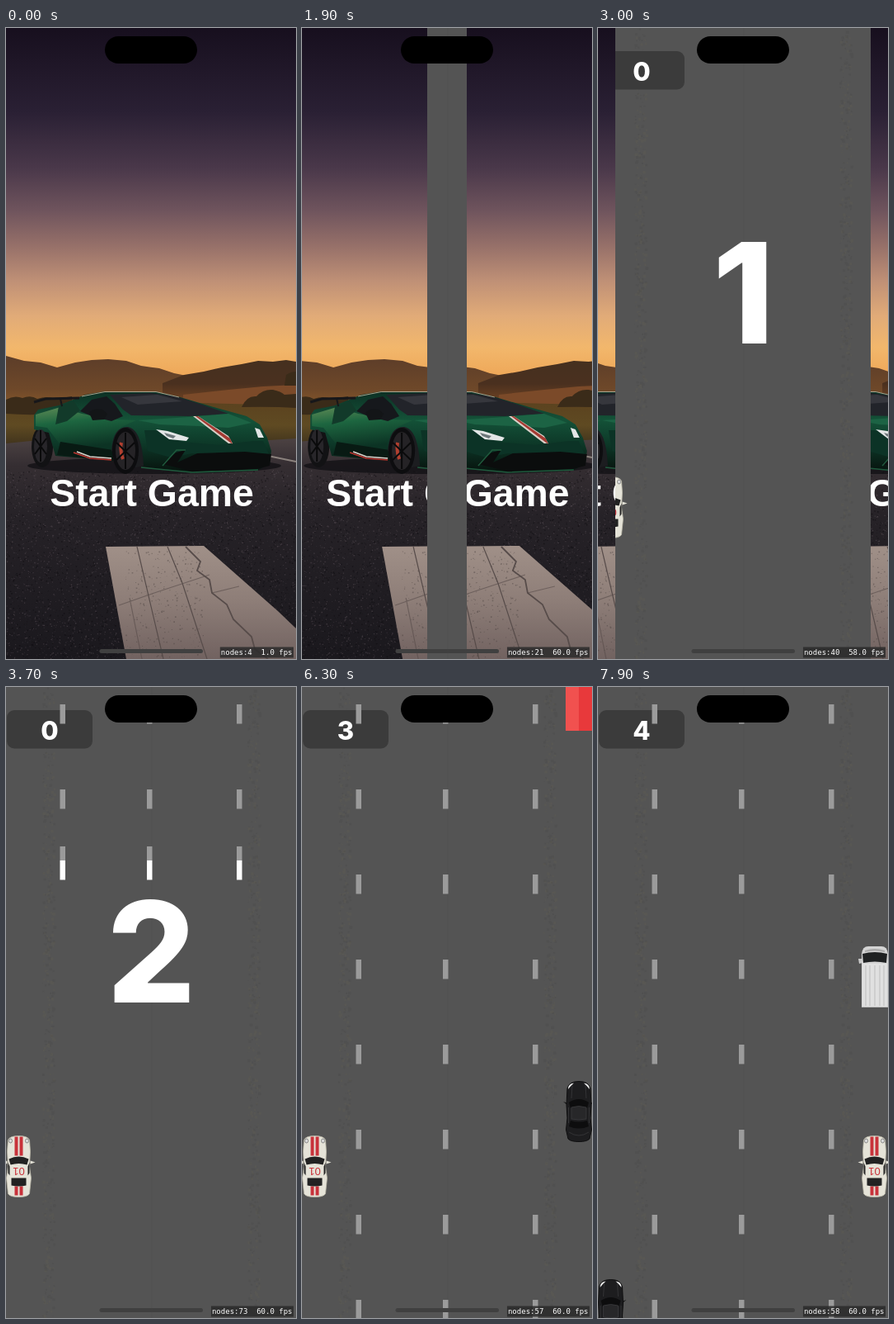
Animation, 352 px wide and 764 px high, one loop 8 s. Source, as an HTML page:

```html
<!DOCTYPE html>
<html lang="en">
<head>
<meta charset="utf-8">
<title>Start Game</title>
<style>
  html, body { margin: 0; width: 100%; height: 100%; overflow: hidden; background: #545454; }
  svg { display: block; width: 352px; height: 764px; }
  .big { font: 800 169px Inter, "Open Sans", sans-serif; }
  .score { font: 800 31px Inter, "Open Sans", sans-serif; }
  .start { font: 700 46.4px "Liberation Sans", Arial, sans-serif; }
  .stats { font: 9px "DejaVu Sans Mono", monospace; }
  .plate { font: 13px "Liberation Sans", Arial, sans-serif; }
</style>
</head>
<body>
<svg viewBox="0 0 352 764" xmlns="http://www.w3.org/2000/svg">
<defs>
  <linearGradient id="sky" x2="0" y2="1">
    <stop offset="0" stop-color="#170f1e"/><stop offset=".24" stop-color="#2a2034"/>
    <stop offset=".4" stop-color="#4a384a"/><stop offset=".52" stop-color="#6f545d"/>
    <stop offset=".62" stop-color="#967069"/><stop offset=".72" stop-color="#bf9076"/>
    <stop offset=".82" stop-color="#e1ab78"/><stop offset=".91" stop-color="#f2b76c"/>
    <stop offset="1" stop-color="#eea656"/>
  </linearGradient>
  <linearGradient id="tarmac" x2="0" y2="1">
    <stop offset="0" stop-color="#4c4242"/><stop offset=".12" stop-color="#352e32"/>
    <stop offset=".35" stop-color="#262227"/><stop offset="1" stop-color="#1a181d"/>
  </linearGradient>
  <linearGradient id="hill" x2="0" y2="1">
    <stop offset="0" stop-color="#5c3d29"/><stop offset=".55" stop-color="#6e4829"/><stop offset="1" stop-color="#93602c"/>
  </linearGradient>
  <linearGradient id="ridge" x2="0" y2="1">
    <stop offset="0" stop-color="#45301f"/><stop offset=".6" stop-color="#4a301f"/><stop offset="1" stop-color="#6b4122"/>
  </linearGradient>
  <linearGradient id="grass" x2="0" y2="1">
    <stop offset="0" stop-color="#5b421f"/><stop offset=".5" stop-color="#5f4a22"/><stop offset="1" stop-color="#392e1b"/>
  </linearGradient>
  <linearGradient id="paint" x2="0" y2="1">
    <stop offset="0" stop-color="#0c3024"/><stop offset=".35" stop-color="#145238"/>
    <stop offset=".65" stop-color="#0d3828"/><stop offset="1" stop-color="#07120d"/>
  </linearGradient>
  <linearGradient id="side" x2=".25" y2="1">
    <stop offset="0" stop-color="#5f8a55"/><stop offset=".4" stop-color="#1d6640"/><stop offset="1" stop-color="#0c3324"/>
  </linearGradient>
  <linearGradient id="stripe" x2="0" y2="1">
    <stop offset="0" stop-color="#a09088"/><stop offset=".5" stop-color="#8d7d77"/><stop offset="1" stop-color="#716260"/>
  </linearGradient>
  <clipPath id="halfL"><path d="M0 0H176V764H0z"/></clipPath>
  <clipPath id="halfR"><path d="M176 0H352V764H176z"/></clipPath>

  <g id="photo">
    <path fill="url(#sky)" d="M0 0H352V425H0z"/>
    <path fill="url(#hill)" d="M0 397L22 403 42 405 62 411 84 405 104 402 124 401 146 403 164 409 186 412 204 418 224 422V470H0z"/>
    <path fill="url(#ridge)" d="M190 430L216 420 240 416 262 411 286 407 306 403 324 404 340 402 352 404V450H190z"/>
    <path fill="#7b4a29" d="M215 444L270 438 312 434 352 432V470H215z"/>
    <path fill="url(#grass)" d="M0 452H120L240 454 352 457V510H0z"/>
    <path fill="#3a2b19" d="M0 450q10 -6 20 -2 10 -4 18 1 12 -4 22 0l20 -3V465q-40 5 -80 2zM286 459q6 -14 18 -13 8 -9 20 -8 10 2 14 6l14 -1V460q-30 -2 -66 -1zM340 420q6 -4 12 -4V433h-14z"/>
    <path fill="url(#tarmac)" d="M0 503L40 499H320L352 497V764H0z"/>
    <path stroke="#8b827d" stroke-width="2" d="M318 518L352 525"/>
    <path id="grit" fill="#6b6067" opacity=".4"/>
    <path id="pits" fill="#0d0b0f" opacity=".5"/>
    <path fill="url(#stripe)" d="M121 628L240 627 330 706 352 727V764H146z"/>
    <g fill="none" stroke="#574c4a" stroke-width="1.2">
      <path d="M159 628L191 764M196 628L214 672 244 764"/>
      <path stroke-width="1.8" d="M218 628L236 646 232 657 247 668 250 684 268 698 276 716 298 737 302 752 318 764"/>
      <path opacity=".6" d="M137 699L180 684 247 662M165 764L150 690M250 684L283 676"/>
    </g>
    <path id="wear" fill="#4c4342" opacity=".45"/>
    <ellipse cx="180" cy="530" rx="154" ry="10" fill="#121114" opacity=".8"/>
    <g>
      <ellipse cx="44" cy="507" rx="13" ry="25" fill="#121214"/>
      <path fill="url(#paint)" d="M34 469L39 462 64 457 96 444 120 440 180 440 208 446 252 459 292 470 308 480 317 496 322 512 320 528 306 535 228 538 186 534 162 530 130 524 60 518 52 490 34 486z"/>
      <path fill="url(#side)" d="M36 468L66 459 92 467 132 474 158 475 140 483 130 494 126 510 84 508 64 502 50 484 36 482z"/>
      <path fill="#123a2a" d="M64 458L82 452 90 463 74 476 60 480z"/>
      <path fill="#081a13" d="M66 501L130 511V524L62 517z"/>
      <path fill="#16181c" d="M90 464L104 450 122 446 132 455 142 470 128 476 104 470z"/>
      <path fill="#22242a" d="M126 444L176 442 206 446 238 456 270 467 222 470 152 469 142 462z"/>
      <path fill="#4a4a50" opacity=".5" d="M140 447L184 444 214 452 160 456z"/>
      <path fill="none" stroke="#a8a590" stroke-width="1" d="M92 446L120 440.5H182L210 447"/>
      <path fill="#131517" d="M101 466q4 -6 16 -4l6 5 -4 7 -14 1z"/>
      <path fill="#1c6344" d="M160 475L222 471 270 467 298 478 270 484 234 482 186 480z"/>
      <path fill="#0c3326" d="M168 487L182 487 214 501 258 505 300 500 312 500 320 518 226 515 200 520 172 512z"/>
      <path fill="#d8d0c8" d="M227 470L233 470 270 494 275 503 270 503z"/>
      <path fill="#a43a32" d="M230 470L233 470 272 497 275 504z"/>
      <path fill="#e3e6e6" d="M182 486L196 488 222 496 219 500 198 498zM302 484L308 486 313 496 306 496z"/>
      <path fill="#6d777a" d="M192 490l14 4 -3 3 -8 -3z"/>
      <path fill="#0b0d0d" d="M190 528L206 514 218 511 208 526 232 515 290 513 322 516 320 530 304 534 226 537z"/>
      <path fill="none" stroke="#1f5a3d" stroke-width="1.5" d="M190 530L207 511 218 511M164 532L226 538 306 535"/>
      <path fill="none" stroke="#ddd4cd" stroke-width="1.6" d="M86 513L102 519 128 521"/>
      <path fill="none" stroke="#bd3631" stroke-width="1.5" d="M82 514L102 521 128 523"/>
      <path fill="none" stroke="#17171a" stroke-width="3" d="M34 453L48 449 89 448"/>
      <path fill="none" stroke="#17171a" stroke-width="2" d="M66 449L68 458"/>
      <path fill="#1c1d20" d="M128 512q2 -30 20 -29 17 3 19 47l-10 2z"/>
      <ellipse cx="145" cy="512" rx="16" ry="28" fill="#0d0d0f"/>
      <ellipse cx="145" cy="512" rx="12" ry="23" fill="#252326"/>
      <path fill="none" stroke="#b23f2f" stroke-width="4" d="M140 502q-2 10 2 20"/>
      <path stroke="#0a0a0b" stroke-width="2" d="M145 490V534M134 502L156 523M134 523L156 502"/>
      <ellipse cx="42" cy="506" rx="8" ry="20" fill="#28262a"/>
      <path stroke="#0a0a0b" stroke-width="2" d="M42 487V525M35 497L49 516M35 516L49 497"/>
    </g>
    <text class="start" x="177" y="579" text-anchor="middle" fill="#fff">Start Game</text>
  </g>

  <g id="racer">
    <path fill="#e5e3d8" d="M-20 -5l6 -2v4zM20 -5l-6 -2v4z"/>
    <path fill="#e5e3d8" stroke="#b9b6a8" stroke-width=".8" d="M-13 -32Q-11 -37 0 -37 11 -37 13 -32L14 -18 13 0 15 14 13 33Q11 37 0 37 -11 37 -13 33L-15 14 -13 0 -14 -18z"/>
    <path fill="#c8323a" d="M-5 -36h4v23h-4zM1 -36h4v23h-4zM-5 24h4v11h-4zM1 24h4v11h-4z"/>
    <path fill="#222" d="M-12 -9Q0 -15 12 -9L10 -2Q0 -5 -10 -2zM-9 14H9V23Q0 25 -9 23zM-13 -5l2 5v11l-2 -3zM13 -5l-2 5v11l2 -3z"/>
    <ellipse cx="-10" cy="-31" rx="2" ry="2.5" fill="#ddd" stroke="#666" stroke-width=".7"/>
    <ellipse cx="10" cy="-31" rx="2" ry="2.5" fill="#ddd" stroke="#666" stroke-width=".7"/>
    <text class="plate" transform="translate(0 1) rotate(180)" text-anchor="middle" fill="#c8323a">01</text>
  </g>
  <g id="sedan">
    <path fill="#151516" d="M-19 -12l6 2v3zM19 -12l-6 2v3z"/>
    <path fill="#1d1d1f" stroke="#0f0f10" d="M-14 -28Q-12 -36.500 0 -36.500 12 -36.500 14 -28L15 -8 14 8 15.500 22 13 33Q10 36.500 0 36.500 -10 36.500 -13 33L-15.500 22 -14 8 -15 -8z"/>
    <path fill="#eee" d="M-13 -27Q-13 -34 -6 -34.500 -10 -31 -13 -27zM13 -27Q13 -34 6 -34.500 10 -31 13 -27z"/>
    <path fill="#0d0d0e" d="M-12 -11Q0 -19 12 -11L10 -4Q0 -8 -10 -4zM-10 11Q0 14 10 11L12 18Q0 23 -12 18z"/>
    <path fill="#272729" stroke="#3c3c3e" stroke-width=".8" d="M-9 -5Q0 -8 9 -5V9Q0 11 -9 9z"/>
    <path fill="none" stroke="#39393b" stroke-width=".8" d="M-8 -32L-9 -16M8 -32L9 -16M-12 25Q0 33 12 25M-12.500 -5V14M12.500 -5V14"/>
  </g>
  <g id="truck">
    <path fill="#e8403f" d="M-15 -37H15L16 -21H-16z"/>
    <path fill="none" stroke="#8d2226" d="M-15 -35.500H15M-14.500 -33V-23H14.500V-33M-7 -31H7V-27H-7z"/>
    <path fill="#f1514f" d="M-16 -21H0V37H-16z"/>
    <path fill="#e8393b" d="M0 -21H16V37H0z"/>
  </g>
  <g id="van">
    <path fill="#c9c9c9" d="M-20 -22h5v5l-4 1zM20 -22h-5v5l4 1z"/>
    <path fill="#d4d4d4" d="M-16 -28Q-15 -37 -8 -37H8Q15 -37 16 -28V37H-16z"/>
    <path fill="#a9a9a9" d="M-12 -32Q0 -36 12 -32V-30Q0 -33 -12 -30z"/>
    <path fill="#1f2122" d="M-15 -28Q0 -32 15 -28L14 -17Q0 -20 -14 -17z"/>
    <path fill="#e0e0e0" d="M-15 -16H15V37H-15z"/>
    <path stroke="#bdbdbd" stroke-width="1" d="M-11 -14V35M-6 -14V35M0 -14V35M6 -14V35M11 -14V35M-16 36.500H16"/>
  </g>
</defs>

<path fill="#545454" d="M0 0H352V764H0z"/>
<path id="verge" fill="#615d52" opacity=".3"/>
<path id="vergeDark" fill="#454545" opacity=".25"/>
<path stroke="#4d4d4d" stroke-width="2" opacity=".15" d="M177 0V764"/>
<rect x="1" y="28" width="104" height="46.500" rx="9" fill="#3b3b3b"/>
<text id="score" class="score" x="53" y="63.500" text-anchor="middle" fill="#fff">0</text>
<path id="dim" fill="#9b9b9b"/>
<path id="lead" fill="#fff"/>
<g id="traffic"></g>
<use id="player" href="#racer"/>
<text id="count" class="big" x="176.500" y="381.500" text-anchor="middle" fill="#fff"></text>
<g id="doors">
  <g id="doorL"><g clip-path="url(#halfL)"><use href="#photo"/></g></g>
  <g id="doorR"><g clip-path="url(#halfR)"><use href="#photo"/></g></g>
</g>
<rect x="120" y="10" width="112" height="33" rx="16.500" fill="#000"/>
<rect x="113.500" y="752" width="125.500" height="5" rx="2.500" fill="#404040"/>
<rect id="statsBox" y="749.500" height="13" fill="#2b2b2b" opacity=".85"/>
<text id="stats" class="stats" x="347.500" y="759" text-anchor="end" fill="#fff"></text>
</svg>
<script>
const LOOP = 8000, STEP = 100, SPEED = 0.515, PITCH = 103;
const $ = id => document.getElementById(id);

// [start time, value]; the last entry reached applies
const scores = [[0, 0], [4200, 1], [5200, 2], [6200, 3], [7200, 4]];
const counts = [[0, ''], [2200, '1'], [3200, '2'], [4200, '3'], [5200, '']];
const stats = [
  [0, '4  1.0'], [1500, '21  60.0'], [2300, '40  58.0'], [3300, '73  60.0'],
  [4500, '43  60.0'], [6300, '57  60.0'], [7500, '58  60.0']
];
const at = (table, t) => table.findLast(row => row[0] <= t)[1];

// sprite, x, and the centre y it has at a known time
const traffic = [
  ['sedan', 336, 102, 5500], ['truck', 336, 325, 6900],
  ['sedan', 15.5, 239, 6900], ['van', 336, 351, 7900]
].map(([id, x, y, time]) => {
  const el = document.createElementNS('http://www.w3.org/2000/svg', 'use');
  el.setAttribute('href', '#' + id);
  $('traffic').append(el);
  return { el, x, y, time };
});

let seed = 7;
const rand = () => (seed = seed * 16807 % 2147483647) / 2147483647;
const specks = (n, x, y, w, h, max) => Array.from({ length: n }, () => {
  const s = (0.5 + rand() * max).toFixed(1);
  return `M${(x + rand() * w).toFixed(1)} ${(y + rand() * h).toFixed(1)}h${s}v${s}h-${s}z`;
}).join('');
$('grit').setAttribute('d', specks(3000, 0, 535, 352, 229, 0.9));
$('pits').setAttribute('d', specks(2500, 0, 535, 352, 229, 1.2));
$('wear').setAttribute('d', specks(300, 145, 632, 95, 130, 1.3));
for (const id of ['verge', 'vergeDark'])
  $(id).setAttribute('d', specks(330, 44, 0, 14, 764, 3) + specks(330, 293, 0, 14, 764, 3));

const dash = (y, h) => [65.5, 171, 280].map(x => `M${x} ${y}h6.500v${h}h-6.500z`).join('');
const move = (el, x, y) => el.setAttribute('transform', `translate(${x} ${y})`);
const clamp = v => Math.min(1, Math.max(0, v));

function drawDashes(t) {
  const lead = 210 + (t - 3700) / STEP * PITCH;
  let dim = '';
  for (let y = 21; y < 764 && y < lead - 40; y += PITCH) dim += dash(y, 23.5);
  $('dim').setAttribute('d', dim + dash(lead - 17, 17));
  $('lead').setAttribute('d', dash(lead, 23.5));
}

function draw(t) {
  const open = 88 * (1 - Math.cos(Math.PI * clamp((t - 1407) / 2053)));
  move($('doorL'), -open, 0);
  move($('doorR'), open, 0);
  $('doors').style.display = open < 176 ? '' : 'none';

  $('score').textContent = at(scores, t);
  $('count').textContent = at(counts, t);
  const info = `nodes:${at(stats, t)} fps`;
  $('stats').textContent = info.replaceAll(' ', '\u00a0');
  const width = info.length * 5.42 + 2.5;
  $('statsBox').setAttribute('x', 349 - width);
  $('statsBox').setAttribute('width', width);

  drawDashes(t);
  for (const c of traffic) move(c.el, c.x, c.y + (t - c.time) * SPEED);
  move($('player'), 15.5 + 320 * clamp((t - 6600) / 200), 580.5);
}

const begin = performance.now();
function tick() {
  const t = (performance.now() - begin) % LOOP;
  draw(Math.floor(t / STEP) * STEP);
  requestAnimationFrame(tick);
}
tick();
</script>
</body>
</html>
```
